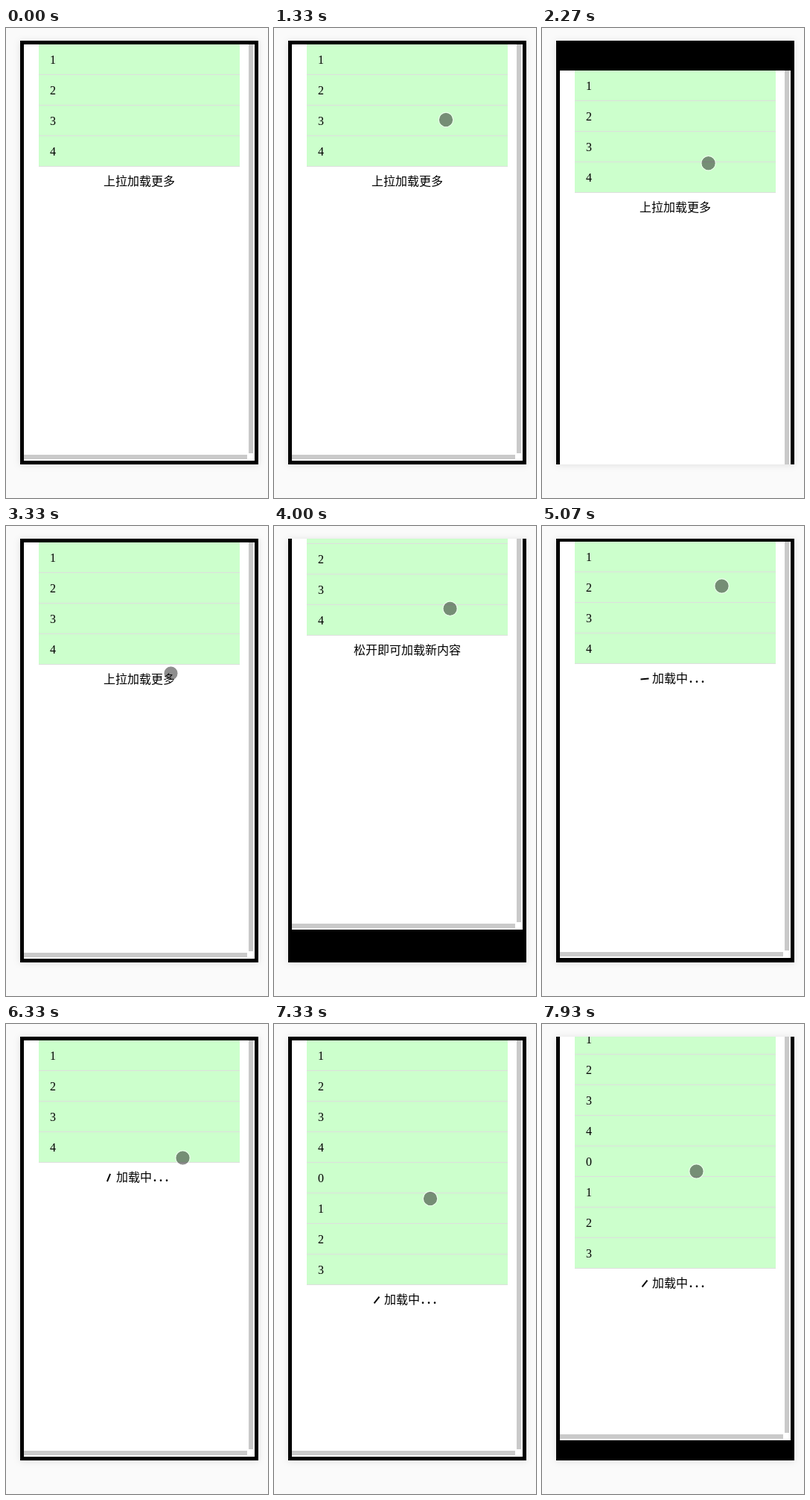
Animation, 352 px wide and 630 px high, one loop 8 s. Source, as an HTML page:

```html
<!DOCTYPE html>
<html lang="zh">
<head>
<meta charset="utf-8">
<title>上拉加载更多</title>
<style>
  html, body { margin: 0; width: 100%; height: 100%; overflow: hidden; background: #fafafa; }
  svg { display: block; width: 352px; height: 630px; }
  .phone { filter: drop-shadow(0 1px 5px rgba(0, 0, 0, .1)); }
  text { font: 300 16px "Noto Sans CJK SC", "Noto Sans CJK", sans-serif; fill: #000; }
  .digit, .dots { font-family: "Liberation Serif", serif; }
  .dots { font-weight: bold; letter-spacing: 4px; }
</style>
</head>
<body>
<svg viewBox="0 0 352 630">
  <clipPath id="screen"><rect x="19" y="17" width="320" height="568"/></clipPath>
  <rect class="phone" x="19" y="17" width="320" height="568"/>
  <g clip-path="url(#screen)">
    <g id="page">
      <rect x="24" y="22" width="310" height="558" fill="#fff"/>
      <g id="list"></g>
      <g id="footer">
        <text id="label" x="179" y="211" text-anchor="middle"></text>
        <g id="loading">
          <rect id="bar" x="132.5" y="205" width="11" height="2"/>
          <text x="148" y="211">加载中</text>
          <text class="dots" x="198" y="211">...</text>
        </g>
      </g>
      <rect x="326" y="22" width="6" height="548" fill="#cacaca"/>
      <rect x="24" y="572" width="300" height="6" fill="#cacaca"/>
    </g>
  </g>
  <g id="touch">
    <circle r="9.2" fill="rgba(30,30,30,.5)"/>
    <circle r="9.8" fill="none" stroke="rgba(255,255,255,.6)" stroke-width="1.2"/>
  </g>
</svg>
<script>
const LOOP = 8000, FRAME = 1000 / 15, ROW = 41, SNAP = 300;
const DRAG = 0.605;   // page pixels per finger pixel
const SPIN = 0.377;   // degrees per ms
const APPEAR = 400, LOAD_START = 4860, LOADED = 6595, SPIN_END = 7333;
const $ = id => document.getElementById(id);

// The finger eases from each place to the next; a move with a release time drags the page.
const home = { x: 36, y: 542 };
const moves = [
  { start: 400, end: 1200, x: 234, y: 136 },
  { start: 1200, end: 1333, x: 231, y: 123 },
  { start: 1660, end: 2667, x: 221.5, y: 197.5, release: 3033 },
  { start: 3400, end: 3533, x: 226, y: 175.5 },
  { start: 3600, end: 4400, x: 241.5, y: 80.5, release: 4827 },
  { start: 5100, end: 5667, x: 237.5, y: 179.5 },
  { start: 6600, end: 7333, x: 210, y: 234 },
  { start: 7400, end: 7733, x: 207.5, y: 196, release: Infinity },
  { start: 7800, end: 7933, x: 207.5, y: 197.5 }
];

const clamp = k => Math.min(1, Math.max(0, k));
const easeOut = k => 1 - (1 - k) ** 1.65;

function touchAt(t) {
  let { x, y } = home;
  for (const m of moves) {
    const k = easeOut(clamp((t - m.start) / (m.end - m.start)));
    x += (m.x - x) * k;
    y += (m.y - y) * k;
  }
  return { x, y };
}

// The CSS "ease" curve.
function ease(x) {
  let lo = 0, hi = 1, s;
  for (let i = 0; i < 20; i++) {
    s = (lo + hi) / 2;
    if (0.75 * s * (1 - s) + s ** 3 < x) lo = s; else hi = s;
  }
  return 0.3 * s * (1 - s) ** 2 + 3 * s * s * (1 - s) + s ** 3;
}

function offsetAt(t) {
  const drag = moves.find(m => m.release && t >= m.start && t < m.release + SNAP);
  if (!drag) return 0;
  const pull = (touchAt(Math.min(t, drag.release)).y - touchAt(drag.start).y) * DRAG;
  return Math.round(pull * (1 - ease(clamp((t - drag.release) / SNAP))));
}

function make(name, attrs, parent, content = "") {
  const el = document.createElementNS("http://www.w3.org/2000/svg", name);
  for (const key in attrs) el.setAttribute(key, attrs[key]);
  el.textContent = content;
  return parent.appendChild(el);
}

const rows = Array.from({ length: 8 }, (_, i) => {
  const y = 22 + i * ROW, row = make("g", {}, $("list"));
  make("rect", { x: 44, y, width: 270, height: ROW, fill: "#ccffcc" }, row);
  make("rect", { x: 44, y: y + ROW - 1, width: 270, height: 1, fill: "#dddfdd" }, row);
  make("text", { class: "digit", x: 59, y: y + 26 }, row, (i + 1) % 5);
  return row;
});

const show = (el, on) => el.setAttribute("display", on ? "inline" : "none");
const move = (el, x, y) => el.setAttribute("transform", `translate(${x} ${y})`);

function draw(time) {
  const t = Math.floor((time + 5) / FRAME) * FRAME;
  const offset = offsetAt(t), loading = t >= LOAD_START, loaded = t >= LOADED;
  move($("page"), 0, offset);
  rows.forEach((row, i) => show(row, i < 4 || loaded));
  move($("footer"), 0, loaded ? 4 * ROW : 0);

  show($("label"), !loading);
  show($("loading"), loading);
  $("label").textContent = offset < -30 ? "松开即可加载新内容" : "上拉加载更多";
  const angle = 86 + SPIN * (Math.min(t, SPIN_END) - LOAD_START + 29);
  $("bar").setAttribute("transform", `rotate(${angle} 138 206)`);

  const { x, y } = touchAt(t);
  show($("touch"), t >= APPEAR - 1);
  move($("touch"), x, y);
}

function tick() {
  draw(performance.now() % LOOP);
  requestAnimationFrame(tick);
}
tick();
</script>
</body>
</html>
```
